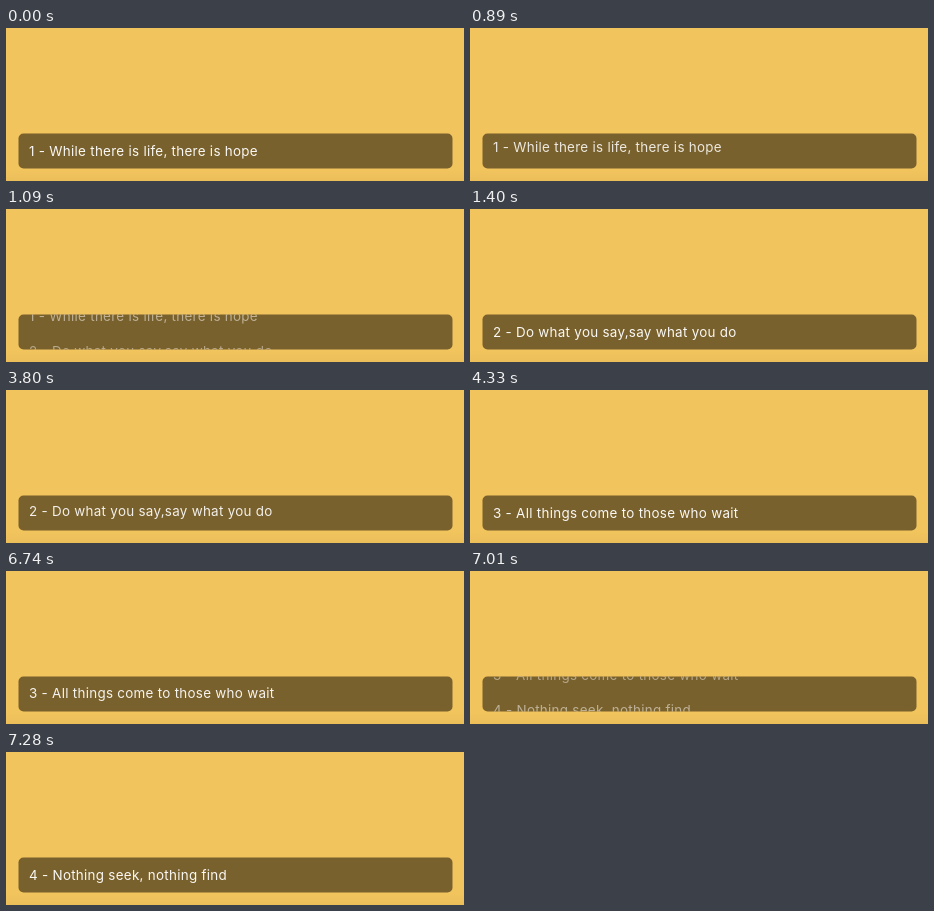
Animation of 458x153 px, one loop 8000 ms. Source, as an HTML page:

```html
<!DOCTYPE html>
<html lang="en">
<head>
<meta charset="utf-8">
<title>Rolling proverbs</title>
<style>
  @property --pos {
    syntax: "<number>";
    inherits: true;
    initial-value: 0;
  }

  html, body {
    margin: 0;
    width: 100%;
    height: 100%;
    overflow: hidden;
  }

  body {
    position: relative;
    background: linear-gradient(#f2c45e 141px, #ebbe5a 153px);
  }

  /* The half-pixel shift keeps the soft edges of the bar. */
  .bar {
    --row: 35px;
    position: absolute;
    left: 13px;
    top: 106px;
    width: 434px;
    height: var(--row);
    border-radius: 5px;
    overflow: hidden;
    background: #79612d;
    transform: translate(-0.5px, -0.5px);
    animation: roll 8s infinite;
  }

  /* Each line sits at its own index; --pos is the index in view. */
  .line {
    --off: calc(var(--i) - var(--pos));
    position: absolute;
    left: 10px;
    top: 0;
    font: 13.4px/34px Inter, "Open Sans", sans-serif;
    letter-spacing: 0.29px;
    white-space: pre;
    color: #faf8f4;
    transform: translate(0.5px, calc(var(--off) * var(--row) + 0.5px));
    opacity: calc(1 - max(var(--off), -1 * var(--off)));
  }

  /* Linear rolls in steps of about 28 ms, settling on a whole index. */
  @keyframes roll {
    0%      { --pos: 0;     animation-timing-function: step-end; }
    10.75%  { --pos: 0.055; animation-timing-function: steps(19); }
    17.499% { --pos: 1.043; animation-timing-function: step-end; }
    17.5%   { --pos: 1;     animation-timing-function: step-end; }
    47.5%   { --pos: 1.055; animation-timing-function: steps(19); }
    54.124% { --pos: 2.043; animation-timing-function: step-end; }
    54.125% { --pos: 2;     animation-timing-function: step-end; }
    84.25%  { --pos: 2.03;  animation-timing-function: steps(20); }
    90.999% { --pos: 3.03;  animation-timing-function: step-end; }
    91%, 100% { --pos: 3; }
  }
</style>
</head>
<body>
  <div class="bar">
    <div class="line" style="--i: 0">1 - While there is life, there is hope</div>
    <div class="line" style="--i: 1">2 - Do what you say,say what you do</div>
    <div class="line" style="--i: 2">3 - All things come to those who wait</div>
    <div class="line" style="--i: 3">4 - Nothing seek, nothing find</div>
  </div>
</body>
</html>
```
